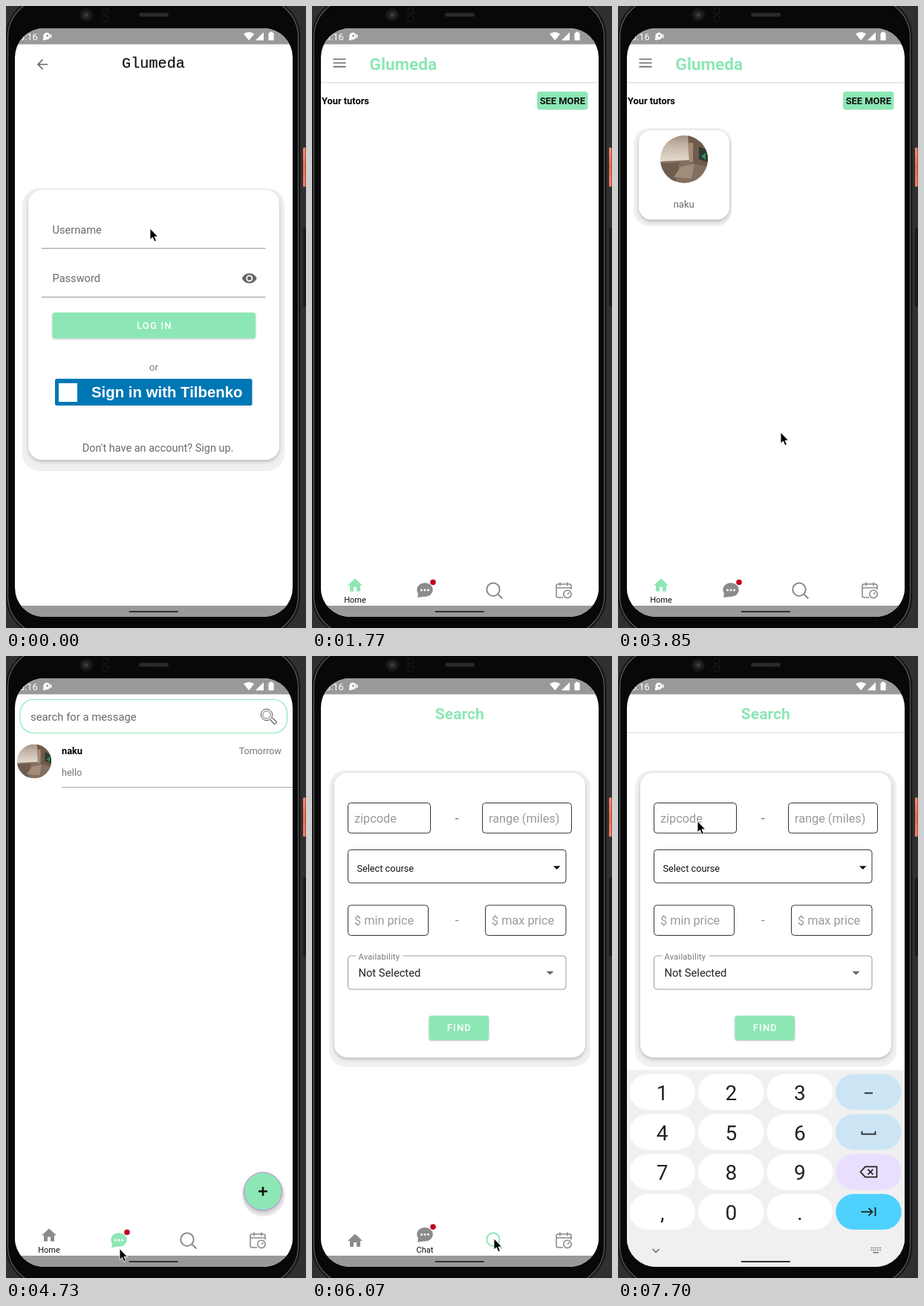
An HTML page that plays this animation: 404x836 px, repeating every 8000 ms.

```html
<!DOCTYPE html>
<html lang="en">
<head>
<meta charset="utf-8">
<title>Tutoring app</title>
<style>
html, body { margin: 0; width: 100%; height: 100%; overflow: hidden; background: #2e2e2e; }
svg { display: block; width: 100vw; height: 100vh; }
text { font-family: Roboto, sans-serif; white-space: pre; }
</style>
</head>
<body>
<svg id="stage" viewBox="0 0 404 836"></svg>
<script>
const GREEN = '#8de7b5', GREY = '#8b8b8b', TEXT = '#6a6a6a';
const LOOP = 8000, TICK = LOOP / 54;

// Markup helpers
const attrs = o => Object.entries(o).map(([k, v]) => ` ${k}="${v}"`).join('');
const box = (x, y, w, h, r, fill, more = {}) =>
  `<rect${attrs({ x, y, width: w, height: h, rx: r, fill, ...more })}/>`;
const disc = (cx, cy, r, fill, more = {}) => `<circle${attrs({ cx, cy, r, fill, ...more })}/>`;
const path = (d, fill, more = {}) => `<path${attrs({ d, fill, ...more })}/>`;
const line = (d, stroke, width = 1, more = {}) =>
  path(d, 'none', { stroke, 'stroke-width': width, ...more });
const text = (s, x, y, size, fill, more = {}) =>
  `<text${attrs({ x, y, 'font-size': size, fill, ...more })}>${s}</text>`;
const group = (id, body, more = {}) => `<g${attrs({ id, ...more })}>${body}</g>`;
const at = (x, y, body, s = 1) => `<g transform="translate(${x} ${y}) scale(${s})">${body}</g>`;
const MID = { 'text-anchor': 'middle' }, BOLD = { 'font-weight': 700 };
const ROUND = { 'stroke-linecap': 'round', 'stroke-linejoin': 'round' };

const card = (x, y, w, h, r, l, t, right, b) =>
  box(x - l, y - t, w + l + right, h + t + b, r + 4, '#f0f0f0') +
  box(x, y, w, h, r, '#fff', { filter: 'url(#lift)' });
const button = (s, x, y, w, h) =>
  box(x, y, w, h, 3, GREEN, { filter: 'url(#low)' }) +
  text(s, x + w / 2 + .6, y + h / 2 + 4.6, 13, '#fff',
    { ...MID, 'font-weight': 500, 'letter-spacing': 1.16 });
const avatar = (x, y, r) => at(x, y, `<g clip-path="url(#round)">
  ${box(-32, -32, 64, 64, 0, 'url(#photo)')}
  ${path('M-32 3L8 1L32 8V32H-32Z', '#84705f')}
  ${path('M-32 6L-6 4L-12 32H-32Z', '#6f5c4d')}
  ${path('M-4 10L14 6L10 26L-14 24Z', '#a08c78')}
  ${path('M5 -32H32V10L8 5Z', '#715b4b')}
  ${path('M5 -22H12V4H7Z', '#a38b75')}
  ${path('M20 -17L32 -12V4L20 0Z', '#2f3b33')}
  ${path('M23 -4L29 -9V1Z', '#2f8d57')}
</g>`, r / 32);

const defs = `<defs>
  <clipPath id="screen">${box(12, 30, 374, 791, 39, '#000')}</clipPath>
  <clipPath id="round">${disc(0, 0, 32, '#000')}</clipPath>
  <linearGradient id="photo" x2="0" y2="1">
    <stop stop-color="#a39384"/><stop offset=".22" stop-color="#c6b8a9"/><stop offset=".5" stop-color="#dfd5c9"/>
  </linearGradient>
  <linearGradient id="power" x2="0" y2="1">
    <stop stop-color="#ff8a70"/><stop offset=".5" stop-color="#f4694e"/><stop offset="1" stop-color="#ff8166"/>
  </linearGradient>
  <filter id="lift" x="-10%" y="-10%" width="120%" height="125%">
    <feDropShadow dx="0" dy="2.5" stdDeviation="2.5" flood-opacity=".23"/>
  </filter>
  <filter id="low" x="-10%" y="-20%" width="120%" height="150%">
    <feDropShadow dx="0" dy="1" stdDeviation=".8" flood-opacity=".3"/>
  </filter>
</defs>`;

const phone =
  box(0, 0, 404, 836, 0, '#303030') +
  box(400, 298, 5, 106, 1, '#1c1c1c') +
  box(400, 190, 3.5, 53, 1.7, 'url(#power)') +
  box(.5, -12, 395, 859, 54, '#08080a', { stroke: '#1a1a1b', 'stroke-width': 2 }) +
  box(2.5, -10, 391, 855, 52, 'none', { stroke: '#5c5d60', 'stroke-width': 1.2 }) +
  disc(108, 12, 9, '#161617') + disc(108, 12, 5.5, '#242528') + disc(108, 12, 2.5, '#3a3c42') +
  box(129, 3, 8, 7, 2, 'none', { stroke: '#1c1c1d' }) +
  box(129, 13, 8, 8, 2, 'none', { stroke: '#1c1c1d' }) +
  box(179, 9, 40, 5.5, 2.5, '#252526') +
  line('M181 11.7H217', '#38383a', 2, { 'stroke-dasharray': '1 1.5' });

const statusBar =
  box(12, 30, 374, 21.5, 0, '#999') +
  text('6:16', 18, 45.5, 12.8, '#fff') +
  disc(55, 40.5, 4.7, '#fff') + disc(55.5, 40, 1.5, '#999') +
  path('M50 42V46H54Z', '#fff') + box(60, 38, 1.4, 5, 0, '#fff') +
  path('M320 37.5Q327 32.5 334.3 37.5L327.2 46.3Z', '#fff') +
  path('M347 35.2V46.3H335.8Z', '#fff') +
  box(353.5, 36, 7.2, 10.3, 1, '#fff') + box(355.3, 34.7, 3.6, 2, 0, '#fff');

const login =
  line('M56 78.5H43.5M49.5 72L43 78.5L49.5 85', '#666', 1.7) +
  text('Glumeda', 198.5, 83, 20.2, '#111', { ...MID, stroke: '#111', 'stroke-width': .2,
    style: "font-family:'Liberation Mono',monospace" }) +
  card(30, 247, 338, 363, 19, 8, 2, 7, 15) +
  text('Username', 62.5, 305.5, 14.6, TEXT) + line('M48 325.8H349.5', '#8c8c8c') +
  text('Password', 62.5, 371, 14.6, TEXT) + line('M48 391.2H349.5', '#8c8c8c') +
  at(317, 355.2, path('M12 4.5C7 4.5 2.73 7.61 1 12c1.73 4.39 6 7.5 11 7.5s9.27-3.11 11-7.5c-1.73-4.39-6-7.5-11-7.5zM12 17a5 5 0 1 1 0-10 5 5 0 0 1 0 10zm0-8a3 3 0 1 0 0 6 3 3 0 0 0 0-6z', '#666'), .9) +
  button('LOG IN', 62.5, 412, 273.5, 34.5) +
  text('or', 199, 490, 13, '#777', MID) +
  box(66, 501, 265.5, 36, 2.5, '#0077b5') + box(71, 507, 25, 25, 0, '#fff') +
  text('Sign in with Tilbenko', 115, 526, 20.4, '#fff',
    { ...BOLD, style: "font-family:'Liberation Sans',sans-serif" }) +
  text("Don't have an account? Sign up.", 204.7, 599, 14.5, TEXT, MID);

const home =
  line('M28.5 71.5H45.5M28.5 76.5H45.5M28.5 81.7H45.5', '#666', 1.7) +
  text('Glumeda', 77.5, 85.5, 22.6, GREEN, BOLD) +
  line('M12 103H386', '#e2e2e2', 1.5) +
  text('Your tutors', 13, 132, 12.8, '#000', BOLD) +
  box(303, 115, 68.5, 24.5, 4, GREEN) +
  text('SEE MORE', 337.3, 132, 12.9, '#111', { ...MID, ...BOLD }) +
  group('tutor', card(28, 167, 122, 120, 17, 7, 3, 3, 9) + avatar(89, 206, 32) +
    text('naku', 88.7, 271, 13, TEXT, MID));

const chat =
  box(19, 58.5, 359.5, 45, 18, '#fff', { stroke: GREEN, 'stroke-width': 1.2 }) +
  text('search for a message', 33, 87, 14.85, TEXT) +
  line('M356 86L361.5 91.5Q364.5 91 364 88L358.5 83', '#555', 1.1) +
  disc(351, 79, 7.7, 'none', { stroke: '#555' }) + disc(351, 79, 5.2, 'none', { stroke: '#777' }) +
  avatar(38, 141.5, 23) +
  text('naku', 75, 132, 12.8, '#000', BOLD) +
  text('Tomorrow', 371, 132, 12.6, '#777', { 'text-anchor': 'end' }) +
  text('hello', 75, 160.5, 12.8, '#777') +
  line('M75 176.5H386', '#aaa') +
  disc(347, 725, 28.5, '#ededed') +
  disc(346, 719.5, 25.5, GREEN, { stroke: '#bd82d6', filter: 'url(#lift)' }) +
  line('M340 719.5H352M346 713.5V725.5', '#111', 2.6);

const field = (hint, x, y, w) =>
  box(x + .5, y + .5, w - 1, 40.5, 4, '#fff', { stroke: '#333' }) +
  text(hint, x + 9, y + 26.8, 16.3, '#9a9a9a');
const search =
  text('Search', 198.8, 85, 21.1, GREEN, { ...MID, ...BOLD }) +
  group('rule', line('M12 103H386', '#e6e6e6', 1.5)) +
  card(30, 157, 338, 382.5, 18, 7, 3, 7, 12.5) +
  field('zipcode', 48, 197, 112) + field('range (miles)', 229, 197, 121) +
  field('$ min price', 48, 334.5, 109) + field('$ max price', 233, 334.5, 109.5) +
  text('-', 195, 224, 17, '#666', MID) + text('-', 195, 361, 17, '#888', MID) +
  box(48.5, 260.5, 293.5, 44.5, 4, '#fff', { stroke: '#333' }) +
  text('Select course', 60.5, 290, 12.7, '#111') + path('M325 282.2H334.5L329.7 287Z', '#111') +
  box(48.5, 403, 293.5, 45, 4, '#fff', { stroke: '#999' }) + box(59, 400, 64, 6, 0, '#fff') +
  text('Availability', 62.5, 408, 11, '#777', { 'letter-spacing': .27 }) +
  text('Not Selected', 62.5, 431, 14.7, '#222') + path('M315.5 423.8H325.5L320.5 428.6Z', '#666') +
  button('FIND', 157.5, 483.5, 80.5, 32.5) +
  group('caret', box(57, 206, 2, 23, 0, GREEN));

// Tab icons are centred on 0,0 and take currentColor
const ink = 'currentColor';
const tabs = [
  { x: 58, label: 'Home', icon: path('M-2 8.5v-6h4v6h5V.5h3L0 -8.7-10 .5h3v8z', ink) },
  { x: 152, label: 'Chat', icon:
    `<ellipse cx="0" cy="-.8" rx="10.8" ry="9.4" fill="${ink}"/>` + path('M-9 3L-9.8 9.6L-1 8.2Z', ink) +
    [-4.5, 0, 4.5].map(x => disc(x, -.6, 1.5, '#fff')).join('') + disc(11, -11, 3.8, '#c4001f') },
  { x: 245, label: 'Search', icon:
    disc(-1, -1.3, 8.7, 'none', { stroke: ink, 'stroke-width': 2 }) + line('M5.3 5L11.3 11', ink, 2.1) },
  { x: 339, label: 'Calendar', icon:
    line('M10 -1V-6Q10 -8.5 7.5 -8.5H-7.5Q-10 -8.5 -10 -6V7Q-10 9.5 -7.5 9.5H-1M-10 -3.5H10M-5 -11V-6M5 -11V-6', ink, 1.6) +
    disc(5, 4.9, 5.2, 'none', { stroke: ink, 'stroke-width': 1.6 }) + line('M5 5.2L7.6 2.6', ink, 1.4) }
];
const nav = box(12, 757, 374, 49, 0, '#fff') + tabs.map((t, i) =>
  group('icon' + i, t.icon) + text(t.label, t.x, 801.5, 11, '#111', { ...MID, id: 'label' + i })).join('');

const keyRows = ['123–', '456⎵', '789⌫', ',0.⇥'];
const keyFills = ['#cce5f4', '#cce5f4', '#e9defd', '#4ed2fd'];
const glyphs = [
  line('M-5.5 1.5H5.5', '#222', 1.8),
  line('M-9 -1V3H9V-1', '#222', 1.8),
  line('M-4.5 -7H11V7H-4.5L-11 0ZM-1 -3.5L6 3.5M6 -3.5L-1 3.5', '#222', 1.7),
  line('M-10 0H5M0 -5L5 0L0 5M9 -6V6', '#222', 1.8)
];
const key = (ch, c, r) => {
  const x = 15.5 + c * 92.6, y = 562 + r * 53.7, cx = x + 44.2, cy = y + 24;
  return box(x, y, 88.5, 48, 24, c < 3 ? '#fff' : keyFills[r]) +
    (c < 3 ? text(ch, cx, cy + 11, 28, '#222', MID) : at(cx, cy, glyphs[r]));
};
const keyboard = box(12, 556.5, 374, 270, 0, '#f0f0f2') +
  keyRows.map((row, r) => [...row].map((ch, c) => key(ch, c, r)).join('')).join('') +
  line('M46.5 797L51 801.5L55.5 797', '#666', 1.5) +
  [0, 1].map(i => line(`M340.5 ${795.5 + i * 3}H354`, '#777', 1.7, { 'stroke-dasharray': '1.8 1.1' })).join('') +
  line('M343.5 801.8H351', '#777', 1.6);

const pages = ['login', 'home', 'chat', 'search'];
const stage = document.getElementById('stage');
stage.innerHTML = defs + phone + `<g clip-path="url(#screen)">` +
  box(12, 30, 374, 791, 0, '#fff') + statusBar +
  group('login', login) + group('home', home) + group('chat', chat) + group('search', search) +
  group('nav', nav) + box(12, 806, 374, 15, 0, '#999') +
  group('keyboard', keyboard) + line('M166.5 814H231', '#333', 2, ROUND) + '</g>' +
  group('cursor', path('M0 0V15L3.4 11.9L5.9 17.6L8.5 16.5L6 11H10.6Z', '#000',
    { stroke: '#fff', 'stroke-width': .9 }));

const el = id => document.getElementById(id);
const show = (id, on) => el(id).setAttribute('display', on ? 'inline' : 'none');
const move = (id, x, y) => el(id).setAttribute('transform', `translate(${x} ${y})`);
const clamp = v => Math.min(1, Math.max(0, v));

// Pointer stops: tick, x, y
const stops = [
  [0, 194, 299], [1, 180, 311], [2, 168, 345], [4, 205, 540], [6, 275, 735], [7, 297, 779], [8, 305, 815],
  [14, 142, 253], [15, 142, 253], [17, 80, 160], [18, 50, 130], [19, 57, 131], [20, 67, 136], [21, 45, 132],
  [23, 66, 236], [26, 219, 573], [28, 222, 770], [29, 196, 819], [31, 150, 803], [33, 156, 790],
  [35, 224, 778], [38, 243, 783], [41, 245, 783], [43, 232, 690], [46, 145, 300], [48, 113, 212],
  [49, 108, 221], [50, 107, 222]
];
function pointer(n) {
  const i = stops.findIndex(s => s[0] > n);
  if (i < 0) return stops.at(-1).slice(1);
  const [a, b] = [stops[i - 1], stops[i]], p = (n - a[0]) / (b[0] - a[0]);
  return [a[1] + (b[1] - a[1]) * p, a[2] + (b[2] - a[2]) * p];
}

const HOME = 11, CARD = 13, CHAT = 32, SEARCH = 41, FOCUS = 48;

function draw(ms) {
  const n = Math.floor(((ms + 20) % LOOP) / TICK);
  const page = n < HOME ? 0 : n < CHAT ? 1 : n < SEARCH ? 2 : 3;
  pages.forEach((id, i) => show(id, i === page));
  show('nav', page > 0);
  show('tutor', n >= CARD);
  show('rule', n > SEARCH);
  show('caret', n >= FOCUS && n < FOCUS + 4);

  const since = n - [0, HOME, CHAT, SEARCH][page];
  const slide = page < 2 ? 1 : clamp(since / 2);
  tabs.forEach((t, i) => {
    const lift = i === page - 1 ? slide : i === page - 2 ? 1 - slide : 0;
    move('icon' + i, t.x, 785.5 - 7.3 * lift);
    el('icon' + i).setAttribute('color', i === page - 1 ? GREEN : GREY);
    el('label' + i).setAttribute('opacity', lift);
  });

  show('keyboard', n > FOCUS);
  move('keyboard', 0, n === FOCUS + 1 ? 110 : 0);
  show('cursor', n < 9 || n >= 14);
  move('cursor', ...pointer(n));
}

const start = performance.now();
(function loop() {
  draw((performance.now() - start) % LOOP);
  requestAnimationFrame(loop);
})();
</script>
</body>
</html>
```
